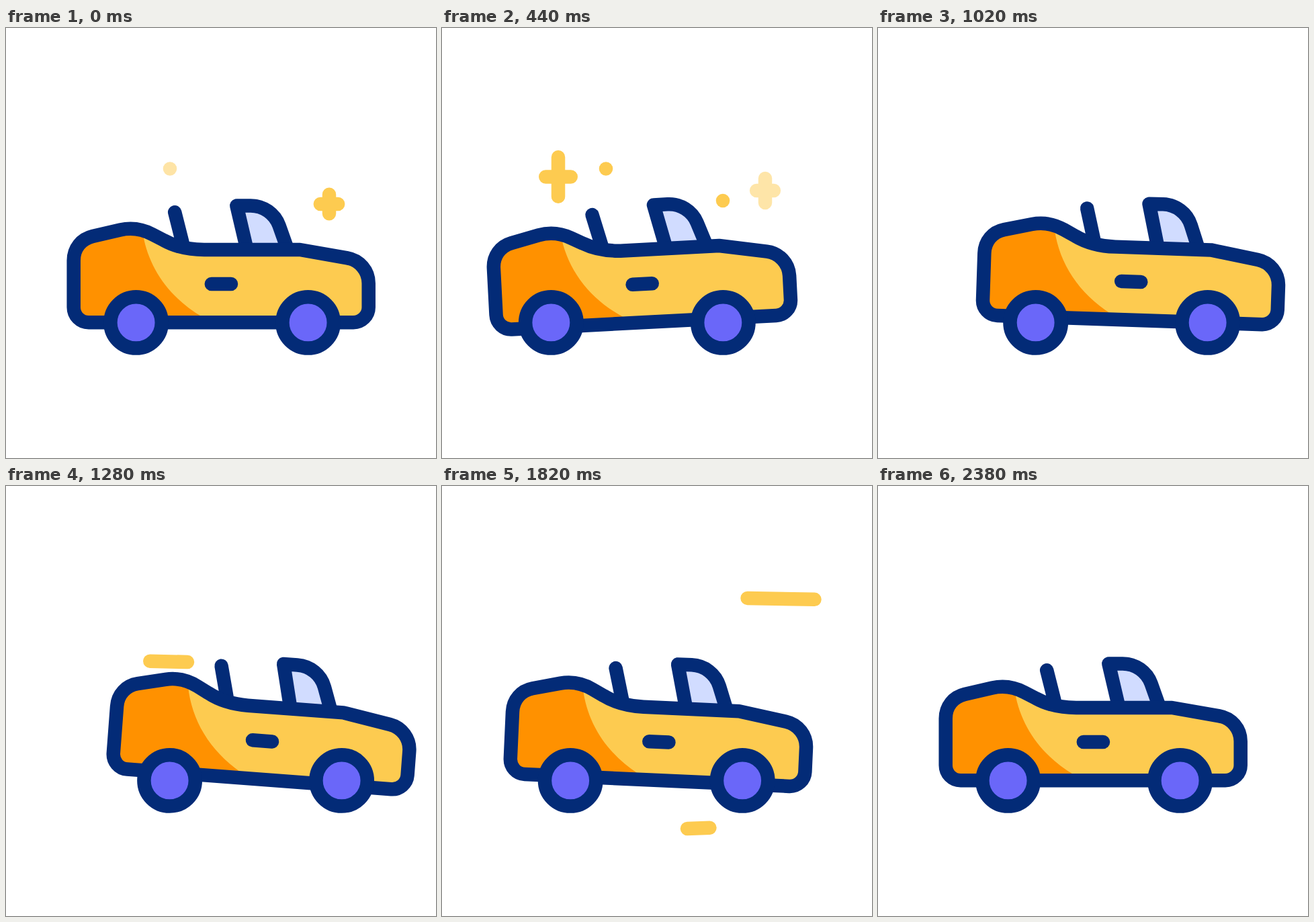
Recreate the animation shown at these times as an HTML page. Size 640 by 640 pixels, loop 2400 ms.

```html
<!DOCTYPE html>
<html lang="en">
<head>
<meta charset="utf-8">
<title>Convertible</title>
<style>
  html, body { margin: 0; width: 100%; height: 100%; overflow: hidden; background: #fff; }
  svg { display: block; width: 100vw; height: 100vh; }
  .line { fill: none; stroke: #032b77; stroke-width: 20.5; stroke-linecap: round; stroke-linejoin: round; }
  .spark { fill: none; stroke: #fdcb50; stroke-width: 20.5; stroke-linecap: round; }
</style>
</head>
<body>
<svg viewBox="0 0 640 640">
  <defs>
    <path id="hull" d="M123 438.2 C110.5 438.2 100.7 428 100.7 415.7 V346 C100.7 328 112 314 129 310
      L170 300.5 C187 296.7 203 299.3 218 307.2 L235 316 C254 326.5 272 330 295 330 H437.5
      L508 342.3 C526 345.5 539.7 361 539.7 380 V415.7 C539.7 428 529.5 438.2 517 438.2 Z"/>
    <clipPath id="inside"><use href="#hull"/></clipPath>
  </defs>
  <g id="car">
    <path class="line" d="M251.2 274.2 L264 325"/>
    <path class="line" style="fill:#d1dcff" d="M357.5 325 L343.3 264.4 H364 C383 264.4 400 276 406.5 294 L417.5 325"/>
    <use href="#hull" fill="#fdcb50"/>
    <path clip-path="url(#inside)" fill="#ff9100" d="M80 280 H199 L204 308 C213 358 243 401 292 430 V450 H80 Z"/>
    <use href="#hull" class="line"/>
    <path class="line" d="M305.8 381 H335"/>
  </g>
  <g id="wheels" class="line" style="fill:#6a67f9">
    <circle cx="193.6" cy="438.4" r="38.2"/>
    <circle cx="449.6" cy="438.4" r="38.2"/>
  </g>
  <g id="sparks"></g>
</svg>
<script>
const LOOP = 2400;

// Each track is a list of [time, value], eased between entries.
const bodyX = [[0, 0], [330, -25], [1115, 58.5], [1330, 58.5], [2010, -12.5], [2330, 0]];
const bodyY = [[440, 0], [1000, -3.6], [1500, -0.4], [2100, 0]];
const tilt = [[0, 0], [407, -3], [1472, 5], [2187, 0]];
const wheelX = [[0, 0], [300, -37], [1200, 50], [1460, 50], [1940, -12], [2300, 0]];

const pluses = [
  { x: 481, y: [[170, 262], [470, 241.5]], w: [[-125, 41], [195, 58], [500, 45]],
    h: [[-125, 33], [195, 79], [500, 54]], fade: [-125, -25, 340, 540] },
  { x: 173, y: [[430, 221.5], [760, 200]], w: [[120, 41], [440, 58], [745, 45]],
    h: [[120, 33], [440, 79], [745, 56]], fade: [120, 220, 590, 785] }
];
const dots = [
  { x: 244, y: 209.5, fade: [-60, 60, 470, 620] },
  { x: 418, y: 257, fade: [240, 340, 590, 785] }
];
// Line from a to b; head and tail give [start, duration].
const dashes = [
  { a: [270, 262], b: [58, 257], head: [1150, 390], tail: [1280, 340] },
  { a: [578, 501.9], b: [365, 510], head: [1366, 400], tail: [1510, 415] },
  { a: [580, 169.3], b: [345, 164.8], head: [1612, 400], tail: [1735, 420] }
];

const clamp = v => Math.min(1, Math.max(0, v));
const smooth = v => { const u = clamp(v); return u * u * (3 - 2 * u); };

function track(keys, t) {
  const i = keys.findIndex(k => k[0] > t);
  if (i === 0) return keys[0][1];
  if (i < 0) return keys[keys.length - 1][1];
  const [t0, v0] = keys[i - 1], [t1, v1] = keys[i];
  return v0 + (v1 - v0) * smooth((t - t0) / (t1 - t0));
}

const fade = ([a, b, c, d], t) => Math.min(clamp((t - a) / (b - a)), clamp((d - t) / (d - c)));

const byId = id => document.getElementById(id);
const car = byId('car'), wheels = byId('wheels'), sparks = byId('sparks');

for (const s of [...pluses, ...dots, ...dashes]) {
  s.el = document.createElementNS('http://www.w3.org/2000/svg', 'path');
  s.el.setAttribute('class', 'spark');
  sparks.append(s.el);
}
for (const d of dots) d.el.setAttribute('d', `M${d.x} ${d.y}h.01`);

function draw(t) {
  car.setAttribute('transform',
    `translate(${track(bodyX, t)} ${track(bodyY, t)}) rotate(${track(tilt, t)} 320 415.7)`);
  wheels.setAttribute('transform', `translate(${track(wheelX, t)} 0)`);

  for (const p of pluses) {
    const y = track(p.y, t), w = track(p.w, t) - 20.5, h = track(p.h, t) - 20.5;
    p.el.setAttribute('d', `M${p.x - w / 2} ${y}h${w}M${p.x} ${y - h / 2}v${h}`);
    p.el.setAttribute('opacity', fade(p.fade, t));
  }
  for (const d of dots) d.el.setAttribute('opacity', fade(d.fade, t));
  for (const { a, b, head, tail, el } of dashes) {
    const part = ([start, length]) => smooth((t - start) / length);
    const at = u => a.map((v, i) => v + (b[i] - v) * u).join(' ');
    const front = part(head), back = part(tail);
    el.setAttribute('d', `M${at(back)}L${at(front)}`);
    el.setAttribute('opacity', front > 0.002 && back < 0.998 ? 1 : 0);
  }
}

const start = performance.now();
function tick() {
  draw((performance.now() - start) % LOOP);
  requestAnimationFrame(tick);
}
tick();
</script>
</body>
</html>
```
